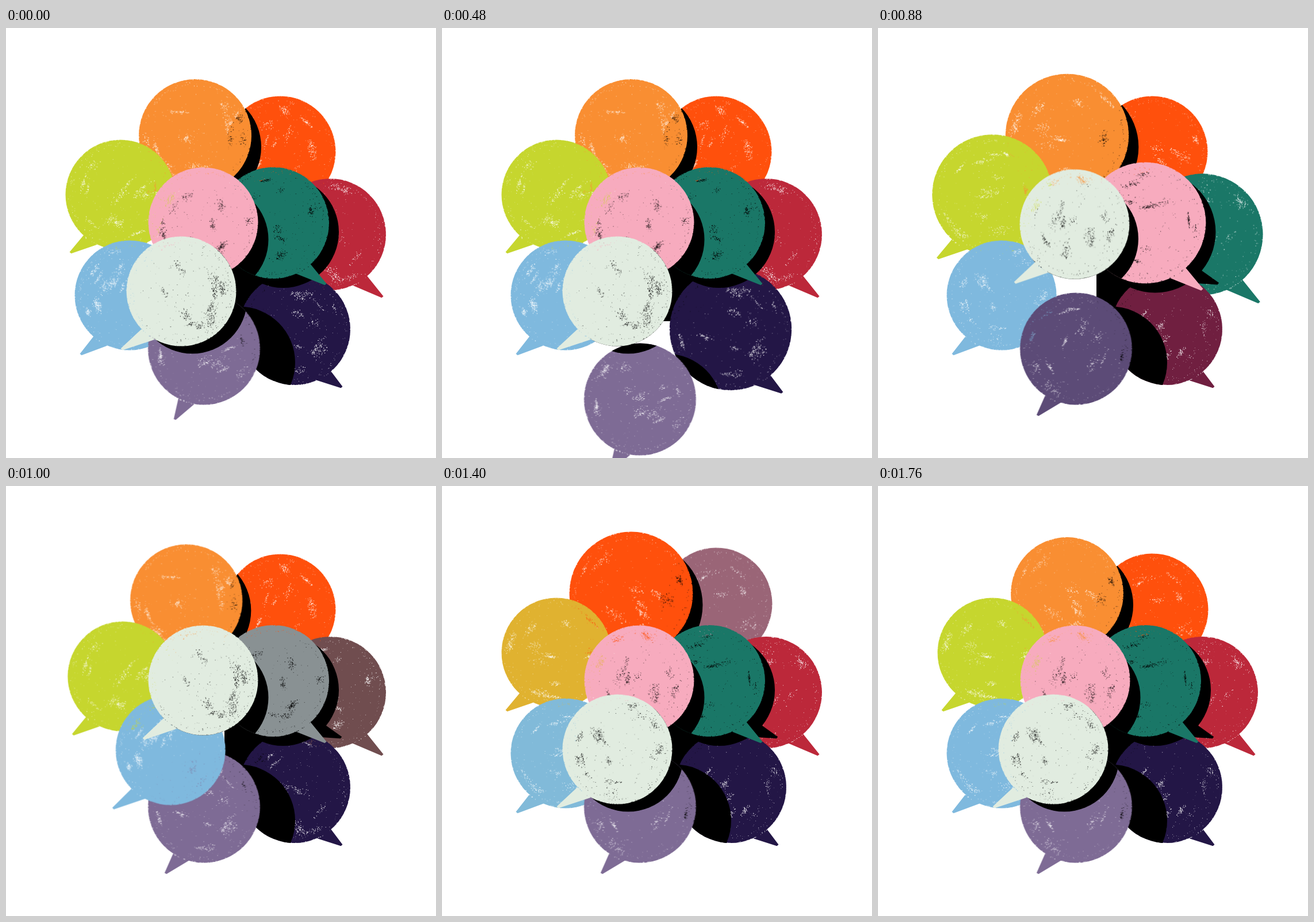
Write an HTML page with a canvas that moves like this. It is 748 px wide and 748 px high and loops after 1.92 s.

```html
<!DOCTYPE html>
<html lang="en">
<head>
<meta charset="utf-8">
<title>Speech bubbles</title>
<style>
  html, body { margin: 0; width: 100%; height: 100%; overflow: hidden; background: #fff; }
  canvas { display: block; width: 100vw; height: 100vh; }
</style>
</head>
<body>
<canvas id="stage" width="748" height="748"></canvas>
<script>
const LOOP = 1920, STEP = 40, GRAIN = 160, FADE = 160, BOX = 360, MID = BOX / 2, TAU = Math.PI * 2;
const ctx = document.getElementById('stage').getContext('2d');

// Resting places: centre, radius, tail tip, shadow offset, stacking, colour
const slot = (x, y, r, tail, shade, z, rgb) => ({ x, y, r, tail, shade, z, rgb });
const slots = {
  A: slot(329, 187, 98, [-84, 100], [17, 20], 1, [249, 142, 50]),
  B: slot(477, 215, 96.5, [-51, 123], [0, 0], 0, [255, 80, 12]),
  C: slot(199, 290, 95.5, [-87, 101], [0, 0], 2, [198, 214, 46]),
  D: slot(343, 338, 95.5, [-104, 102], [18, 30], 10, [247, 171, 190]),
  E: slot(465, 339, 97, [91, 107], [17, 16], 9, [26, 119, 103]),
  F: slot(564, 359, 97, [91, 109], [0, 0], 4, [188, 40, 58]),
  G: slot(215, 465, 95.5, [-85, 103], [0, 0], 3, [127, 185, 222]),
  H: slot(305, 458, 95.5, [-104, 101], [19, 13], 12, [225, 236, 224]),
  I: slot(502, 524, 97, [82, 101], [0, 0], 5, [35, 22, 70]),
  J: slot(344.5, 558, 97.5, [-67, 116], [61, 24], 6, [126, 107, 149])
};

// Each bubble moves on to the next place, then fades to that place's colour.
// castOn and castTo name the bubbles its shadow falls on, before and after the move.
const route = (from, to, start, end, fade, extra) => ({ from: slots[from], to: slots[to], start, end, fade, ...extra });
const bubbles = {
  navy: route('I', 'J', 540, 660, 780, { castOn: ['crimson'], castTo: ['crimson'] }),
  crimson: route('F', 'I', 600, 720, 800),
  green: route('E', 'F', 622, 822, 915),
  pink: route('D', 'E', 660, 860, 920, { sway: true, tailShade: true, castOn: ['green', 'crimson', 'pink'] }),
  mint: route('H', 'D', 700, 900, 1020, { lift: true, castOn: ['purple', 'mint'], castTo: ['pink', 'mint'] }),
  blue: route('G', 'H', 880, 1050, 1125, { lift: true, castTo: ['navy', 'blue'] }),
  lime: route('C', 'G', 937, 1137, 1245),
  orange: route('A', 'C', 940, 1220, 1320, { tailShade: true, castOn: ['red'] }),
  red: route('B', 'A', 1104, 1350, 1520, { castTo: ['purple'] }),
  purple: route('J', 'B', 0, 0, 1365, { castOn: ['navy'] })
};

const clamp = v => Math.max(0, Math.min(1, v));
const mix = (a, b, k) => a + (b - a) * k;
const mixAll = (a, b, k) => a.map((v, i) => mix(v, b[i], k));
const smooth = p => p * p * (3 - 2 * p);
const pulse = (t, start, span) => Math.sin(Math.PI * clamp((t - start) / span));

function random(seed) {
  return () => {
    seed = seed + 0x6D2B79F5 | 0;
    let n = Math.imul(seed ^ seed >>> 15, 1 | seed);
    n = n + Math.imul(n ^ n >>> 7, 61 | n) ^ n;
    return ((n ^ n >>> 14) >>> 0) / 4294967296;
  };
}

function makeCanvas() {
  const c = document.createElement('canvas');
  c.width = c.height = BOX;
  return c;
}

// Crayon gaps: streaky patches, loose specks and a worn rim
function makeGrain(seed) {
  const c = makeCanvas(), g = c.getContext('2d'), rnd = random(seed);
  const bell = () => rnd() + rnd() + rnd() - 1.5;
  const speck = (x, y, s) => g.fillRect(MID + x - s / 2, MID + y - s / 2, s, s);
  const around = (a, d, s) => speck(Math.cos(a) * d, Math.sin(a) * d, s);
  const slant = rnd() * 3;
  for (let i = 0; i < 15; i++) {
    const a = rnd() * TAU, d = 84 * Math.sqrt(rnd());
    const dir = d > 50 ? a + Math.PI / 2 : slant;
    const long = 8 + rnd() * 10, wide = 2 + rnd() * 6, count = 15 + rnd() * 45;
    for (let j = 0; j < count; j++) {
      const u = bell() * long, v = bell() * wide;
      speck(Math.cos(a) * d + Math.cos(dir) * u - Math.sin(dir) * v,
            Math.sin(a) * d + Math.sin(dir) * u + Math.cos(dir) * v, .4 + rnd() * .9);
    }
  }
  for (let i = 0; i < 130; i++) around(rnd() * TAU, 90 * Math.sqrt(rnd()), .3 + rnd() * .6);
  for (let i = 0; i < 120; i++) around(rnd() * TAU, 88 + bell() * 4, .3 + rnd() * .7);
  for (let i = 0; i < 160; i++) around(rnd() * TAU, 97 + bell(), .5 + rnd() * .8);
  return c;
}

Object.values(bubbles).forEach((b, i) => {
  b.grain = [0, 1, 2].map(k => makeGrain(101 + i * 17 + k * 977));
});

function mixTail(a, b, k) {
  const angle = mix(Math.atan2(a[1], a[0]), Math.atan2(b[1], b[0]), k);
  return { angle, reach: mix(Math.hypot(...a), Math.hypot(...b), k) };
}

function pose(b, t) {
  const { from, to } = b;
  const q = b.end ? smooth(clamp((t - b.start) / (b.end - b.start))) : 0;
  const p = {
    q, x: mix(from.x, to.x, q), y: mix(from.y, to.y, q), z: mix(from.z, to.z, q ** 3),
    r: mix(from.r, to.r, q),
    tail: mixTail(from.tail, to.tail, q),
    shade: mixAll(from.shade, to.shade, q),
    rgb: mixAll(from.rgb, to.rgb, clamp((t - b.fade) / FADE)),
    scale: 1
  };
  if (b.end) p.scale += .1 * Math.max(pulse(t, b.start - 100, 100), pulse(t, b.end - 20, 120));
  if (b.lift) {
    const k = clamp((Math.abs(2 * q - 1) - .6) / .4);
    p.shade = p.shade.map(v => v * k);
  }
  if (b.sway) {
    const k = Math.sin(Math.PI * q);
    p.shade = [p.shade[0] - 14 * k, p.shade[1] + 7 * k];
  }
  return p;
}

// Falls out below, comes back in from above
function posePurple(b, t) {
  const p = pose(b, t);
  p.tail = mixTail(b.to.tail, b.to.tail, 0);
  if (t < 1000) {
    const drop = 88 * (Math.max(0, t - 80) / 400) ** 2;
    p.y += drop;
    p.shade = p.shade.map(v => v * clamp(1 - drop / 355));
  } else {
    p.x = b.to.x;
    p.y = b.to.y - 330 * (Math.max(0, 1451 - t) / 291) ** 2;
    p.z = b.to.z;
    p.shade = [0, 0];
  }
  return p;
}

// The tail's foot sits a little nearer the bottom than its tip
function trace(g, x, y, p, tail) {
  const r = p.r * p.scale;
  g.beginPath();
  g.arc(x, y, r, 0, TAU);
  if (!tail) return;
  const { angle, reach } = tail, foot = mix(angle, Math.PI / 2, .2);
  const at = (a, d) => [x + Math.cos(a) * d, y + Math.sin(a) * d];
  g.moveTo(...at(foot - .17, r * .97));
  g.lineTo(...at(angle - .014, reach * p.scale));
  g.lineTo(...at(angle + .014, reach * p.scale));
  g.lineTo(...at(foot + .17, r * .97));
  g.closePath();
}

function drawShade(b, p, poses) {
  const [dx, dy] = p.shade;
  if (Math.abs(dx) + Math.abs(dy) < .5) return;
  const floor = p.q < .6 ? b.castOn : b.castTo;
  ctx.save();
  if (floor) {
    ctx.beginPath();
    for (const name of floor) {
      const o = poses[name], r = o.r * o.scale;
      ctx.moveTo(o.x + r, o.y);
      ctx.arc(o.x, o.y, r, 0, TAU);
    }
    ctx.clip();
  }
  const tail = b.tailShade && { angle: p.tail.angle - .18, reach: p.tail.reach * .93 };
  trace(ctx, p.x + dx, p.y + dy, p, tail);
  ctx.fillStyle = '#000';
  ctx.fill();
  ctx.restore();
}

const sheet = makeCanvas(), ink = sheet.getContext('2d');

function drawBubble(b, p, k) {
  ink.globalCompositeOperation = 'source-over';
  ink.clearRect(0, 0, BOX, BOX);
  trace(ink, MID, MID, p, p.tail);
  ink.fillStyle = `rgb(${p.rgb.map(Math.round)})`;
  ink.fill();
  ink.globalCompositeOperation = 'destination-out';
  const size = BOX * p.scale * p.r / 97;
  ink.drawImage(b.grain[k], MID - size / 2, MID - size / 2, size, size);
  ctx.drawImage(sheet, p.x - MID, p.y - MID);
}

function draw(t) {
  const poses = {};
  for (const name in bubbles) poses[name] = (name === 'purple' ? posePurple : pose)(bubbles[name], t);
  ctx.fillStyle = '#fff';
  ctx.fillRect(0, 0, 748, 748);
  // Dark gap in the middle of the cluster
  ctx.fillStyle = '#000';
  ctx.fillRect(380, 400, 75, 110);
  const k = Math.floor(t / GRAIN) % 3;
  Object.keys(poses).sort((a, b) => poses[a].z - poses[b].z).forEach(name => {
    drawShade(bubbles[name], poses[name], poses);
    drawBubble(bubbles[name], poses[name], k);
  });
}

let last = -1;
const origin = performance.now();
function tick() {
  const t = Math.floor((performance.now() - origin) % LOOP / STEP) * STEP;
  if (t !== last) draw(last = t);
  requestAnimationFrame(tick);
}
tick();
</script>
</body>
</html>
```
